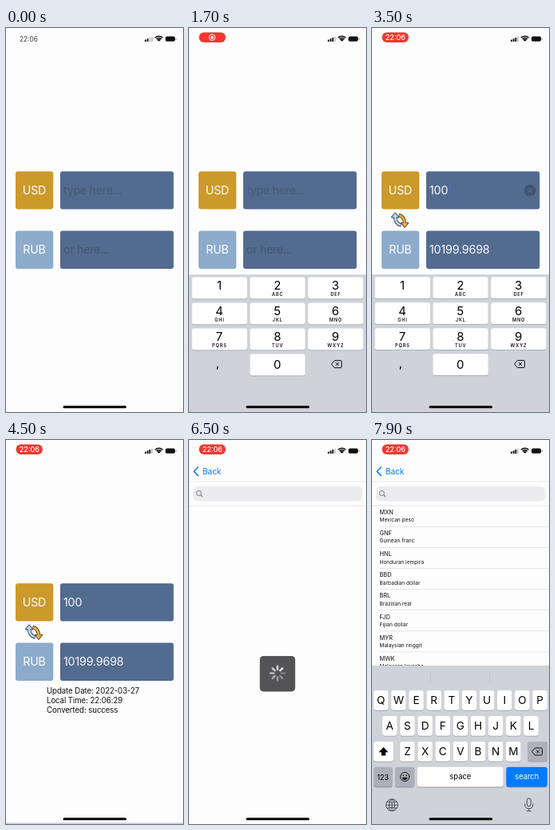
Animation of 222x480 px, one loop 8 s. Source, as an HTML page with a canvas:

```html
<!DOCTYPE html>
<html lang="en">
<head>
<meta charset="utf-8">
<title>Currency converter</title>
<style>
html, body { margin: 0; width: 100%; height: 100%; overflow: hidden; background: #fefdfe; }
canvas { display: block; width: 222px; height: 480px; }
</style>
</head>
<body>
<canvas id="stage"></canvas>
<script>
const W = 222, H = 480, LOOP = 8000;
const canvas = document.getElementById('stage');
const dpr = window.devicePixelRatio || 1;
canvas.width = W * dpr;
canvas.height = H * dpr;
const c = canvas.getContext('2d');

const PAPER = '#fefdfe', KEYS_BG = '#d0d2d9', KEY_DARK = '#acb0ba', BLUE = '#007aff';
const ROWS = [
  ['MXN', 'Mexican peso'], ['GNF', 'Guinean franc'], ['HNL', 'Honduran lempira'],
  ['BBD', 'Barbadian dollar'], ['BRL', 'Brazilian real'], ['FJD', 'Fijian dollar'],
  ['MYR', 'Malaysian ringgit'], ['MWK', 'Malawian kwacha'], ['SVC', 'Salvadoran colón'],
  ['THB', 'Thai baht'], ['KES', 'Kenyan shilling'], ['PLN', 'Polish zloty'],
  ['DKK', 'Danish krone'], ['PEN', 'Peruvian sol'], ['JOD', 'Jordanian dinar'],
  ['UAH', 'Ukrainian hryvnia']
];
const PAD = ['', 'ABC', 'DEF', 'GHI', 'JKL', 'MNO', 'PQRS', 'TUV', 'WXYZ'];

const T = {
  pill: 500, focus: 1200, pillTime: 2200, press: [2200, 2400, 2600], result: 3100,
  hide: 4130, reset: 5600, push: 5778, list: 6700, search: 7200
};

const clamp = x => Math.max(0, Math.min(1, x));
const ramp = (t, start, len) => clamp((t - start) / len);
// Critically damped spring from 0 to 1
function spring(t, start) {
  const x = Math.max(0, t - start) * 0.018;
  return 1 - (1 + x) * Math.exp(-x);
}

function text(s, x, y, size, color, { align = 'left', weight = 400, gap = 0 } = {}) {
  c.font = `${weight} ${size}px Inter, "Liberation Sans", sans-serif`;
  c.letterSpacing = gap + 'px';
  c.textAlign = align;
  c.textBaseline = 'alphabetic';
  c.fillStyle = color;
  c.fillText(s, x, y);
}
const center = (s, x, y, size, color = '#000', opts = {}) =>
  text(s, x, y, size, color, { align: 'center', ...opts });

function rect(x, y, w, h, color) {
  c.fillStyle = color;
  c.fillRect(x, y, w, h);
}
function box(x, y, w, h, r, color) {
  c.beginPath();
  c.roundRect(x, y, w, h, r);
  c.fillStyle = color;
  c.fill();
}
function disc(x, y, r, color) {
  c.beginPath();
  c.arc(x, y, r, 0, Math.PI * 2);
  c.fillStyle = color;
  c.fill();
}
function ring(x, y, r, color, width) {
  c.beginPath();
  c.arc(x, y, r, 0, Math.PI * 2);
  stroke(color, width);
}
function stroke(color, width) {
  c.strokeStyle = color;
  c.lineWidth = width;
  c.stroke();
}
function line(points, color, width) {
  c.beginPath();
  points.forEach(([x, y]) => c.lineTo(x, y));
  stroke(color, width);
}
function curve(d, color, width) {
  c.strokeStyle = color;
  c.lineWidth = width;
  c.stroke(new Path2D(d));
}
function group(draw, alpha = 1, dx = 0, dy = 0) {
  c.save();
  c.globalAlpha *= alpha;
  c.translate(dx, dy);
  draw();
  c.restore();
}

function statusBar(t) {
  const on = ramp(t, T.pill, 200);
  group(() => text('22:06', 17, 16.5, 8.3, '#444'), 1 - on);
  group(() => {
    box(12.5, 5.5, 33.5, 12.5, 6.2, '#f8352e');
    const time = ramp(t, T.pillTime, 200);
    group(() => {
      ring(29, 11.7, 3.8, '#fff', 1);
      disc(29, 11.7, 2, '#fff');
    }, 1 - time);
    group(() => center('22:06', 29.3, 15, 9, '#fff', { weight: 500 }), time);
  }, on);

  const bars = t < 1400 ? 2 : 3;
  for (let i = 0; i < 4; i++) {
    const h = 2.6 + i * 1.2;
    box(174 + i * 2.7, 17 - h, 1.9, h, 0.5, i < bars ? '#111' : '#c4c4c6');
  }
  for (const r of [2, 4.4, 6.8]) {
    c.beginPath();
    c.arc(191.8, 17, r, -Math.PI * 0.75, -Math.PI * 0.25);
    stroke('#111', r === 2 ? 2.4 : 1.5);
  }
  box(200, 10.6, 12, 6.2, 1.8, '#111');
  box(212.6, 12.6, 1, 2.2, 0.5, '#777');
}

function swapIcon() {
  const arrow = color => {
    c.lineCap = 'butt';
    curve('M29 235 Q29 245 36.5 246.5', '#2b3036', 4.4);
    const head = new Path2D('M29 231.4 L33.2 236.6 L24.8 236.6 Z');
    c.lineJoin = 'round';
    c.strokeStyle = '#2b3036';
    c.lineWidth = 1.6;
    c.stroke(head);
    c.fillStyle = color;
    c.fill(head);
    curve('M29 235 Q29 244.4 36 246.3', color, 2.7);
  };
  group(() => arrow('#b5dcf5'));
  c.save();
  c.translate(70, 480.4);
  c.rotate(Math.PI);
  arrow('#f4ac32');
  c.restore();
}

function field(y, value, hint) {
  box(68, y, 142.3, 47.3, 3, '#536b8f');
  text(value || hint, 72, y + 28.8, 14.3, value ? '#f4f6f9' : '#455875', { gap: value ? -0.2 : -0.3 });
}

function converter(t) {
  rect(0, 0, W, H, PAPER);
  const active = t < T.reset;
  const typed = active ? '100'.slice(0, T.press.filter(p => t >= p).length) : '';
  const done = active && t >= T.result;

  box(12, 179.2, 47.3, 47.3, 3, '#cc992b');
  center('USD', 35.5, 208, 14.2, '#fff', { gap: -0.2 });
  box(12, 253.6, 47.3, 47.3, 3, '#8dabcb');
  center('RUB', 35.5, 282.4, 14.2, '#fff', { gap: -0.2 });
  field(179.2, typed, 'type here...');
  field(253.6, done ? '10199.9698' : '', 'or here...');
  if (typed) swapIcon();

  const focused = t >= T.focus && t < T.hide;
  if (focused) {
    const typing = t >= T.press[0] && t < 2800;
    const x = [72.6, 80, 88.6, 97.2][typed.length];
    if (typing || (t - T.focus + 900) % 1000 < 500) rect(x, 194.5, 1.3, 16, '#3f6fd8');
    if (typed) {
      disc(198.2, 203, 7.3, '#43546f');
      line([[195.7, 200.5], [200.7, 205.5]], '#536b8f', 1.2);
      line([[200.7, 200.5], [195.7, 205.5]], '#536b8f', 1.2);
    }
  }
  if (done) {
    ['Update Date: 2022-03-27', 'Local Time: 22:06:29', 'Converted: success']
      .forEach((s, i) => text(s, 51, 316.6 + i * 12, 9.7, '#111', { gap: -0.1 }));
  }
}

function key(x, y, w, h, color = '#fff') {
  box(x, y + 0.8, w, h, 3, '#95989f');
  box(x, y, w, h, 3, color);
}

function deleteIcon(x, y) {
  c.lineJoin = 'round';
  curve(`M${x - 6.5} ${y} l4 -4.5 h7.5 q1.5 0 1.5 1.5 v6 q0 1.5 -1.5 1.5 h-7.5 Z`, '#111', 1);
  line([[x - 1, y - 2], [x + 3, y + 2]], '#111', 1);
  line([[x + 3, y - 2], [x - 1, y + 2]], '#111', 1);
}

function numberPad(t) {
  rect(0, 308, W, 190, KEYS_BG);
  const down = i => t >= T.press[i] - 40 && t < T.press[i] + 80;
  for (let i = 0; i < 9; i++) {
    const x = 3.5 + (i % 3) * 72.8, y = 311.3 + Math.floor(i / 3) * 32;
    key(x, y, 69.5, 27, i === 0 && down(0) ? KEY_DARK : '#fff');
    center(i + 1, x + 34.5, y + 15.2, 15);
    center(PAD[i], x + 35, y + 23.6, 5.6, '#111', { weight: 600, gap: 0.9 });
  }
  key(76.3, 407.3, 69.5, 27, down(1) || down(2) ? KEY_DARK : '#fff');
  center('0', 110.8, 425.8, 15);
  center(',', 36, 424, 15);
  deleteIcon(185, 420);
}

function letterRow(letters, x, y) {
  [...letters].forEach((s, i) => {
    const mid = x + i * 22.15;
    key(mid - 9.3, y, 18.6, 24.8);
    center(s, mid, y + 17.4, 13.6);
  });
}

function letterKeyboard() {
  rect(0, 282, W, 200, KEYS_BG);
  rect(73, 289, 0.8, 15, '#bfc2c9');
  rect(147.3, 289, 0.8, 15, '#bfc2c9');
  letterRow('QWERTYUIOP', 11.2, 313);
  letterRow('ASDFGHJKL', 22.3, 345);
  letterRow('ZXCVBNM', 44.4, 377);

  key(2, 377, 24.8, 24.8);
  c.fillStyle = '#000';
  c.fill(new Path2D('M14.4 384 L20.4 390.2 H17 V394.6 H11.8 V390.2 H8.4 Z'));
  key(195.3, 377, 24.8, 24.8, KEY_DARK);
  deleteIcon(207, 389.5);

  key(2, 408.8, 23.6, 24.8, KEY_DARK);
  center('123', 13.8, 424.8, 9);
  key(29, 408.8, 24.2, 24.8, KEY_DARK);
  ring(41.2, 421, 5.6, '#111', 1);
  disc(39.2, 419.4, 0.8, '#111');
  disc(43.2, 419.4, 0.8, '#111');
  c.fillStyle = '#111';
  c.fill(new Path2D('M37.8 421.8 H44.6 Q44 425 41.2 425 Q38.4 425 37.8 421.8 Z'));
  key(56.8, 408.8, 107.8, 24.8);
  center('space', 110.8, 424.4, 9.4);
  key(168.4, 408.8, 51.4, 24.8, BLUE);
  center('search', 194.2, 424.4, 9.4, '#fff');

  const ink = '#4a4d52';
  ring(25, 456.3, 7.4, ink, 1);
  c.beginPath();
  c.ellipse(25, 456.3, 3.5, 7.4, 0, 0, Math.PI * 2);
  stroke(ink, 0.9);
  line([[25, 449], [25, 463.7]], ink, 0.9);
  line([[17.6, 456.3], [32.4, 456.3]], ink, 0.9);
  curve('M18.9 452.3 Q25 454.3 31.1 452.3 M18.9 460.3 Q25 458.3 31.1 460.3', ink, 0.9);
  c.beginPath();
  c.roundRect(194.3, 447.8, 5, 10, 2.5);
  stroke(ink, 1);
  curve('M191.8 454.5 V456 Q191.8 460.7 196.8 460.7 Q201.8 460.7 201.8 456 V454.5 M196.8 460.7 V463.6 M193.8 463.8 H199.8', ink, 1);
}

function spinner(t) {
  box(88.8, 270, 44.4, 44.4, 4.5, '#545355');
  const head = Math.floor(t / 100) % 8;
  c.lineCap = 'round';
  for (let i = 0; i < 8; i++) {
    const a = i * Math.PI / 4 - Math.PI / 2;
    const age = (head - i + 8) % 8;
    const at = r => [111 + Math.cos(a) * r, 291.6 + Math.sin(a) * r];
    line([at(4.8), at(8.8)], `rgba(255,255,255,${0.85 - age * 0.085})`, 2.5);
  }
  c.lineCap = 'butt';
}

function listPage(t) {
  rect(0, 0, W, H, PAPER);
  rect(0, 51.7, W, 0.6, '#dcdcdf');
  box(5, 58, 212.3, 18.4, 5.5, '#ececef');
  ring(12.4, 66.4, 3, '#77777c', 1);
  line([[14.6, 68.6], [17, 71]], '#77777c', 1.1);
  rect(0, 81.8, W, 0.6, '#d6d6da');

  if (t < T.list) spinner(t);
  else {
    ROWS.forEach(([code, name], i) => {
      const y = 82 + i * 26.1;
      text(code, 9.5, y + 11, 7.4, '#111');
      text(name, 9.5, y + 20.3, 6.5, '#111', { gap: 0.05 });
      rect(9.5, y + 26, W, 0.6, '#d6d6da');
    });
    group(() => box(218.4, 54, 2, 24, 1, '#a2a2a6'), 1 - ramp(t, 7450, 250));
  }
  if (t >= T.search && (t - T.search) % 1000 < 500) rect(21, 62, 1.2, 10.6, '#3c6be0');
}

function backButton(p) {
  group(() => {
    c.lineCap = c.lineJoin = 'round';
    line([[11.3, 34], [6.2, 39.2], [11.3, 44.4]], BLUE, 1.5);
    text('Back', 17 + 33 * (1 - p), 42.8, 10, BLUE);
  }, p);
}

function paint(t) {
  c.setTransform(dpr, 0, 0, dpr, 0, 0);
  c.lineCap = 'butt';
  c.lineJoin = 'miter';
  const p = spring(t, T.push);

  if (p < 0.999) group(() => converter(t), 1, -67 * p);
  if (p > 0) {
    rect(0, 0, W, H, `rgba(0,0,0,${0.1 * p})`);
    group(() => listPage(t), 1, p > 0.999 ? 0 : W * (1 - p));
    backButton(p);
  }

  const pad = spring(t, T.focus) - spring(t, T.hide);
  if (pad > 0.002) group(() => numberPad(t), 1, 0, 172 * (1 - pad));
  const abc = spring(t, T.search);
  if (abc > 0) group(letterKeyboard, 1, 0, 198 * (1 - abc));

  statusBar(t);
  box(71.5, 472.3, 79.5, 3, 1.5, '#050505');
}

const begin = performance.now();
function tick() {
  paint((performance.now() - begin) % LOOP);
  requestAnimationFrame(tick);
}
tick();
</script>
</body>
</html>
```
